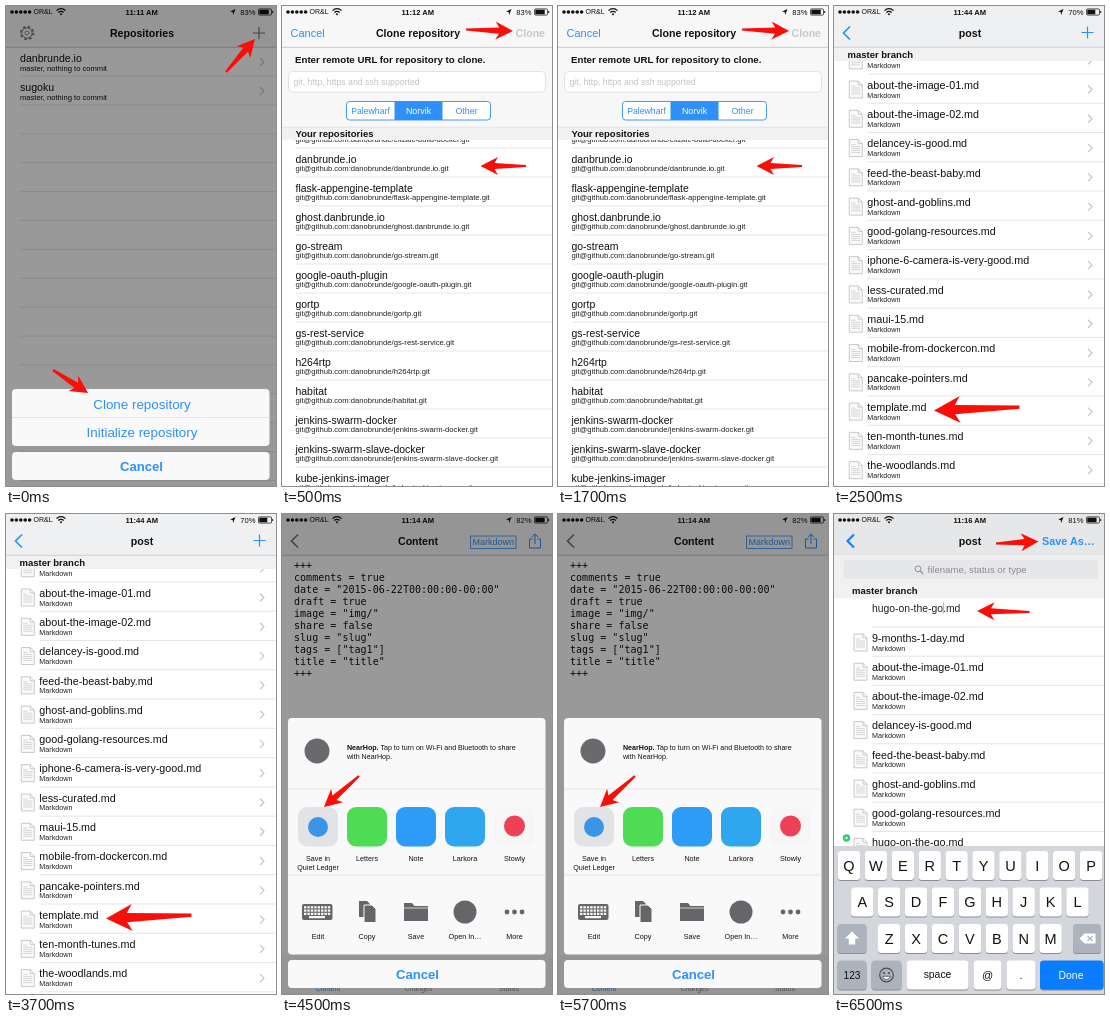
An HTML page that plays this animation: 270 by 480 pixels, repeating every 8 s.

```html
<!DOCTYPE html>
<html lang="en">
<head>
<meta charset="utf-8">
<title>Repository walkthrough</title>
<style>
  html, body { margin: 0; width: 100%; height: 100%; overflow: hidden; background: #fff; }
  svg { display: block; width: 100vw; height: 100vh; }
  text { font-family: "Liberation Sans", Arial, sans-serif; white-space: pre; }
  .code { font-family: "DejaVu Sans Mono", monospace; }
  .scene { visibility: hidden; animation: 8s step-end infinite; }
  #add { animation-name: add; }
  #clone { animation-name: clone; }
  #files { animation-name: files; }
  #share { animation-name: share; }
  #save { animation-name: save; }
  @keyframes add { 0% { visibility: visible } 6.25%, 100% { visibility: hidden } }
  @keyframes clone { 0% { visibility: hidden } 6.25% { visibility: visible } 31.25%, 100% { visibility: hidden } }
  @keyframes files { 0% { visibility: hidden } 31.25% { visibility: visible } 56.25%, 100% { visibility: hidden } }
  @keyframes share { 0% { visibility: hidden } 56.25% { visibility: visible } 81.25%, 100% { visibility: hidden } }
  @keyframes save { 0% { visibility: hidden } 81.25%, 100% { visibility: visible } }
</style>
</head>
<body>
<svg id="stage" viewBox="0 0 270 480" preserveAspectRatio="none"></svg>
<script>
const BLUE = '#2e90f8', INK = '#111', LINE = '#dcdcde', BAR = '#f7f7f7';
const USER = 'danobrunde', SITE = 'danbrunde.io';

const esc = s => s.replace(/&/g, '&amp;').replace(/</g, '&lt;');
const rect = (x, y, w, h, fill, r = 0, more = '') =>
  `<rect x="${x}" y="${y}" width="${w}" height="${h}" rx="${r}" fill="${fill}" ${more}/>`;
const circle = (x, y, r, fill, more = '') =>
  `<circle cx="${x}" cy="${y}" r="${r}" fill="${fill}" ${more}/>`;
const path = (d, stroke, w = 1, fill = 'none') =>
  `<path d="${d}" fill="${fill}" stroke="${stroke}" stroke-width="${w}"/>`;
const rule = (x, y, x2 = 270, color = LINE) => path(`M${x} ${y}H${x2}`, color, .7);

// y is the vertical middle of the capitals
const text = (x, y, s, size, fill = INK, more = '') =>
  `<text x="${x}" y="${(y + size * .35).toFixed(2)}" font-size="${size}" fill="${fill}" ${more}>${esc(s)}</text>`;
const MID = 'text-anchor="middle"', END = 'text-anchor="end"', BOLD = 'font-weight="700"';

const chevron = (x, y) => path(`M${x - 2} ${y - 4}l4 4l-4 4`, '#c4c4c8', 1.2);
const back = (x, color = BLUE, w = 1.7) => path(`M${x + 7} 20.5l-6.5 6.5l6.5 6.5`, color, w);
const plus = (x, y, color) => path(`M${x - 6} ${y}h12M${x} ${y - 6}v12`, color, 1.2);

// red pointer with its tip at (x, y)
function arrow(x, y, tailX, tailY, k = 1) {
  const len = Math.hypot(x - tailX, y - tailY), turn = Math.atan2(y - tailY, x - tailX) * 180 / Math.PI;
  const neck = -14 * k, barb = -17.5 * k, w = 3.1 * k;
  return `<path transform="translate(${x} ${y}) rotate(${turn.toFixed(1)})" fill="#fb0d08"
    d="M0 0L${barb} ${-9 * k}L${neck} ${-w}L${-len} ${-1.1 * k}V${1.1 * k}L${neck} ${w}L${barb} ${9 * k}Z"/>`;
}

function status(time, charge) {
  let s = '';
  for (let i = 0; i < 5; i++) s += circle(6 + i * 4.4, 6, 1.8, INK);
  s += text(27.5, 6, 'OR&L', 7);
  s += path('M50.5 4.6a6.3 6.3 0 0 1 9 0M52.3 6.5a3.8 3.8 0 0 1 5.4 0', INK, 1.2);
  s += path('M53.7 7.9a1.9 1.9 0 0 1 2.6 0l-1.3 1.5z', 'none', 0, INK);
  s += text(135.7, 6, time, 7.6, INK, MID + ' ' + BOLD);
  s += path('M229.5 3l-5.5 2.6l2.7.5l.4 2.8z', 'none', 0, INK);
  s += text(249.5, 6, charge + '%', 7.6, INK, END);
  s += rect(252.5, 2.9, 13, 6.2, 'none', 1, `stroke="${INK}" stroke-width=".7"`);
  s += rect(253.3, 3.7, 11.4 * charge / 100, 4.6, INK);
  return s + rect(266.2, 5, 1, 2, INK);
}

const nav = (time, charge, title, fill = BAR) => rect(0, 0, 270, 41, fill) + status(time, charge) +
  text(136, 27, title, 10.6, INK, MID + ' ' + BOLD) + rule(0, 41.3, 270, '#b8b8ba');
const screen = body => rect(0, 0, 270, 480, '#fff') + body;
const dim = () => rect(0, 0, 270, 480, '#000', 0, 'opacity=".4"');
const sheet = (y, h) => rect(6, y, 257.5, h, '#f9f9f9', 4);
const cancel = () => sheet(446, 28) + text(135.5, 460, 'Cancel', 13.1, BLUE, MID + ' ' + BOLD);
const heading = (x, y, h, s) => rect(0, y, 270, h, '#f1f1f2') + text(x, y + h / 2, s, 9.5, INK, BOLD);

function page(x, y) {
  let d = `M${x + 2} ${y + 5}h4`;
  for (let i = 1; i < 5; i++) d += `M${x + 2} ${y + 5 + i * 2}h9`;
  return path(`M${x} ${y}h9l4 4v13h-13zM${x + 9} ${y}v4h4`, '#bcbcbe', .8, '#fafafa') + path(d, '#c6c6c8', .7);
}

function fileRow(x, y, name, arrowed) {
  return page(x - 18, y - 4) + text(x, y, name, 10.75) + text(x, y + 10, 'Markdown', 7.2, '#222') +
    rule(x, y + 18.2) + (arrowed ? chevron(256, y + 4.5) : '');
}

function addScene() {
  const row = (y, name) => text(14, y, name, 10.6) + text(14, y + 10, 'master, nothing to commit', 7.6) + chevron(256, y + 4);
  let s = nav('11:11 AM', 83, 'Repositories');
  s += circle(21, 27, 5.2, 'none', 'stroke="#777" stroke-width="1"') + circle(21, 27, 2, 'none', 'stroke="#777" stroke-width=".8"');
  s += circle(21, 27, 6.4, 'none', 'stroke="#777" stroke-width="1.6" stroke-dasharray="2.5 2.53"');
  s += plus(253, 27, '#777') + row(52, SITE) + row(81, 'sugoku');
  for (let y = 70; y < 480; y += 28.9) s += rule(14, y.toFixed(1));
  s = screen(s) + dim() + sheet(383, 57) + rule(6, 411.5, 263.5);
  s += text(136, 398, 'Clone repository', 13.4, BLUE, MID) + text(136, 426, 'Initialize repository', 13.4, BLUE, MID);
  return s + cancel() + arrow(249, 33, 220, 66) + arrow(82, 387, 47, 364);
}

function cloneScene() {
  const repos = [SITE, 'flask-appengine-template', 'ghost.' + SITE, 'go-stream', 'google-oauth-plugin', 'gortp',
    'gs-rest-service', 'h264rtp', 'habitat', 'jenkins-swarm-docker', 'jenkins-swarm-slave-docker', 'kube-jenkins-imager'];
  const url = (y, name) => text(13.5, y, `git@github.com:${USER}/${name}.git`, 7.65, '#222');
  let s = url(133.5, 'elastic-build-docker') + rule(14, 142);
  repos.forEach((name, i) => {
    const y = 153 + i * 29;
    s += text(13.5, y, name, 10.45) + url(y + 9.5, name) + rule(14, y + 18);
  });
  s += rect(0, 41, 270, 80, BAR) + nav('11:12 AM', 83, 'Clone repository');
  s += text(8.5, 27, 'Cancel', 11, BLUE) + text(263, 27, 'Clone', 10.6, '#c8c8ca', END + ' ' + BOLD);
  s += text(13, 53.5, 'Enter remote URL for repository to clone.', 9.7, INK, BOLD);
  s += rect(6.5, 65.5, 257, 20.5, '#fff', 4, 'stroke="#dcdcdf" stroke-width=".8"');
  s += text(11.5, 76, 'git, http, https and ssh supported', 8.7, '#c3c3c8');
  s += rect(64.5, 95.5, 144, 18.5, '#fff', 3, `stroke="${BLUE}" stroke-width=".9"`) + rect(112.5, 95.5, 48, 18.5, BLUE);
  s += text(88.5, 105, 'Palewharf', 8.7, BLUE, MID) + text(136.5, 105, 'Norvik', 8.9, '#fff', MID) + text(184.5, 105, 'Other', 8.9, BLUE, MID);
  s += heading(13.5, 121.5, 12.5, 'Your repositories') + rule(0, 121.3);
  return screen(s) + arrow(231, 25, 184, 23.5) + arrow(198.5, 160, 244, 160);
}

function filesScene() {
  const names = ['about-the-image-01', 'about-the-image-02', 'delancey-is-good', 'feed-the-beast-baby',
    'ghost-and-goblins', 'good-golang-resources', 'iphone-6-camera-is-very-good', 'less-curated', 'maui-15',
    'mobile-from-dockercon', 'pancake-pointers', 'template', 'ten-month-tunes', 'the-woodlands'];
  let s = fileRow(33.3, 49.8, '', true);
  names.forEach((name, i) => s += fileRow(33.3, 79 + i * 29.28, name + '.md', true));
  s += heading(13.5, 42, 13, 'master branch') + nav('11:44 AM', 70, 'post', '#eff0f1') + back(9) + plus(253.5, 26.5, BLUE);
  return screen(s) + arrow(100, 404.5, 185.5, 401, 1.5);
}

function shareScene() {
  const code = ['+++', 'comments = true', 'date = "2015-06-22T00:00:00-00:00"', 'draft = true', 'image = "img/"',
    'share = false', 'slug = "slug"', 'tags = ["tag1"]', 'title = "title"', '+++'];
  const cols = [36, 85, 134, 183, 232.5], GREY = '#66666a';
  let s = nav('11:14 AM', 82, 'Content') + back(9, '#777');
  s += rect(188.5, 22, 45.5, 12.5, 'none', 0, `stroke="${BLUE}" stroke-width=".8"`) + text(211.3, 28.2, 'Markdown', 9, BLUE, MID);
  s += path('M250.5 25h-3v9h11v-9h-3M253 30v-10M250 23l3-3l3 3', BLUE);
  code.forEach((line, i) => s += text(12, 51 + i * 12, line, 10.06, INK, 'class="code"'));
  s += rect(0, 441, 270, 39, BAR);
  ['Content', 'Changes', 'Status'].forEach((tab, i) => s += text(46 + i * 90.5, 475, tab, 7, i ? '#888' : BLUE, MID));
  s = screen(s) + dim() + sheet(204, 236.5) + rule(6, 275, 263.5) + rule(6, 361, 263.5);

  s += circle(35, 237, 12.5, '#6a6a6e');
  s += `<text x="65" y="235.6" font-size="7.1" fill="${INK}"><tspan ${BOLD}>NearHop.</tspan> Tap to turn on Wi-Fi and Bluetooth to share</text>`;
  s += text(65, 243, 'with NearHop.', 7.1);

  const tiles = ['#e2e3e6', '#4fdc55', '#2c9cf6', '#2ea7ee', '#f6f6f6'];
  const apps = ['Save in', 'Letters', 'Note', 'Larkora', 'Stowly'];
  cols.forEach((x, i) => s += rect(x - 20, 293, 40, 39.5, tiles[i], 9) + text(x, 344, apps[i], 7.2, INK, MID));
  s += circle(36, 313, 10, '#3b95e6') + circle(232.5, 312, 10.5, '#ee4056') + text(36, 353, 'Quiet Ledger', 7.2, INK, MID);

  s += rect(20, 390, 30.5, 16, GREY, 2);
  for (let r = 0; r < 3; r++) for (let c = 0; c < 8; c++) s += rect(22 + c * 3.4, 392.2 + r * 3.3, 2.4, 2.2, '#f9f9f9');
  s += rect(27, 402, 16, 2.2, '#f9f9f9');
  s += path('M77 387h8l3 3v13h-11z', 'none', 0, GREY) + path('M82 391h8l4 4v13.5h-12z', '#f9f9f9', 1, GREY);
  s += path('M122 389h8l2.5 3h13.5v15h-24z', 'none', 0, GREY) + rule(122, 394, 146, '#f9f9f9');
  s += circle(183, 398, 11.5, GREY);
  for (let i = -1; i < 2; i++) s += circle(232.5 + i * 7.5, 398, 2.4, GREY);
  ['Edit', 'Copy', 'Save', 'Open In…', 'More'].forEach((name, i) => s += text(cols[i], 422, name, 7.2, INK, MID));
  return s + cancel() + arrow(42, 293, 77, 262);
}

function keyboard() {
  const DARK = '#adb3bd', FACE = '#4a4d52';
  const key = (x, y, w, fill = '#fff') => rect(x, y + 1, w, 29, '#8b8e94', 3.5) + rect(x, y, w, 29, fill, 3.5);
  let s = rect(0, 332, 270, 148, '#d3d6db');
  [['QWERTYUIOP', 15, 337], ['ASDFGHJKL', 28.3, 373.5], ['ZXCVBNM', 55.2, 410]].forEach(([letters, x0, y]) =>
    [...letters].forEach((c, i) => {
      const x = x0 + i * 26.9;
      s += key(x - 11.2, y, 22.4) + text(x, y + 14.8, c, 14.5, INK, MID);
    }));
  s += key(3.5, 410, 29, DARK) + path('M18 417.5l7 7h-3.8v6h-6.4v-6h-3.8z', 'none', 0, '#fff');
  s += key(239, 410, 28, DARK) + path('M245.5 424.5l5-5h11v10h-11z', 'none', 0, '#fff') + path('M253.5 422l5 5m0-5l-5 5', DARK, 1.1);
  s += key(3.5, 446.5, 29, DARK) + text(18, 461, '123', 10.2, INK, MID);
  s += key(37.5, 446.5, 30, DARK) + circle(52.5, 461, 6.8, 'none', `stroke="${FACE}" stroke-width="1.2"`);
  s += circle(50, 459, 1.1, FACE) + circle(55, 459, 1.1, FACE) + path('M48.5 462.3a4.1 4.1 0 0 0 8 0z', FACE, .8, '#fff');
  s += key(72.5, 446.5, 62) + text(103.5, 460, 'space', 10.4, INK, MID);
  s += key(139.5, 446.5, 28) + text(153.5, 461, '@', 11, INK, MID);
  s += key(172.5, 446.5, 29) + text(187, 461, '.', 11, INK, MID);
  return s + key(206, 446.5, 63.5, '#0a7cff') + text(237, 461, 'Done', 10.4, '#fff', MID);
}

function saveScene() {
  const names = ['9-months-1-day', 'about-the-image-01', 'about-the-image-02', 'delancey-is-good',
    'feed-the-beast-baby', 'ghost-and-goblins', 'good-golang-resources', 'hugo-on-the-go'];
  const SHADE = '#e6e7e9';
  let s = nav('11:16 AM', 81, 'post', SHADE) + back(13, '#1784fb', 2.2) + text(260.5, 27, 'Save As…', 10.8, BLUE, END + ' ' + BOLD);
  s += rect(0, 41, 270, 29, '#f0f0f1') + rect(9.5, 46, 254.5, 19, SHADE, 3.5);
  s += circle(84, 54.8, 2.9, 'none', 'stroke="#8e8e93" stroke-width="1"') + path('M86.2 57l3 3', '#8e8e93', 1.1);
  s += text(93.5, 55.5, 'filename, status or type', 9.6, '#8c8c91');
  s += heading(18, 69.5, 15, 'master branch') + text(38, 94, 'hugo-on-the-go.md', 10.4, '#222') + rule(37.5, 113);
  s += path('M109.3 88.5v11', '#6fa8f5', .9);
  names.forEach((name, i) => s += fileRow(38, 124 + i * 29.2, name + '.md', false));
  s += circle(12.5, 324, 3.7, '#35c976') + circle(12.5, 324, 1.3, '#d9f6e6');
  return screen(s) + keyboard() + arrow(204.5, 27.5, 162, 29.5) + arrow(143, 97, 195.5, 98);
}

const scenes = { add: addScene, clone: cloneScene, files: filesScene, share: shareScene, save: saveScene };
document.getElementById('stage').innerHTML = Object.entries(scenes)
  .map(([id, draw]) => `<g id="${id}" class="scene">${draw()}</g>`).join('');
</script>
</body>
</html>
```
